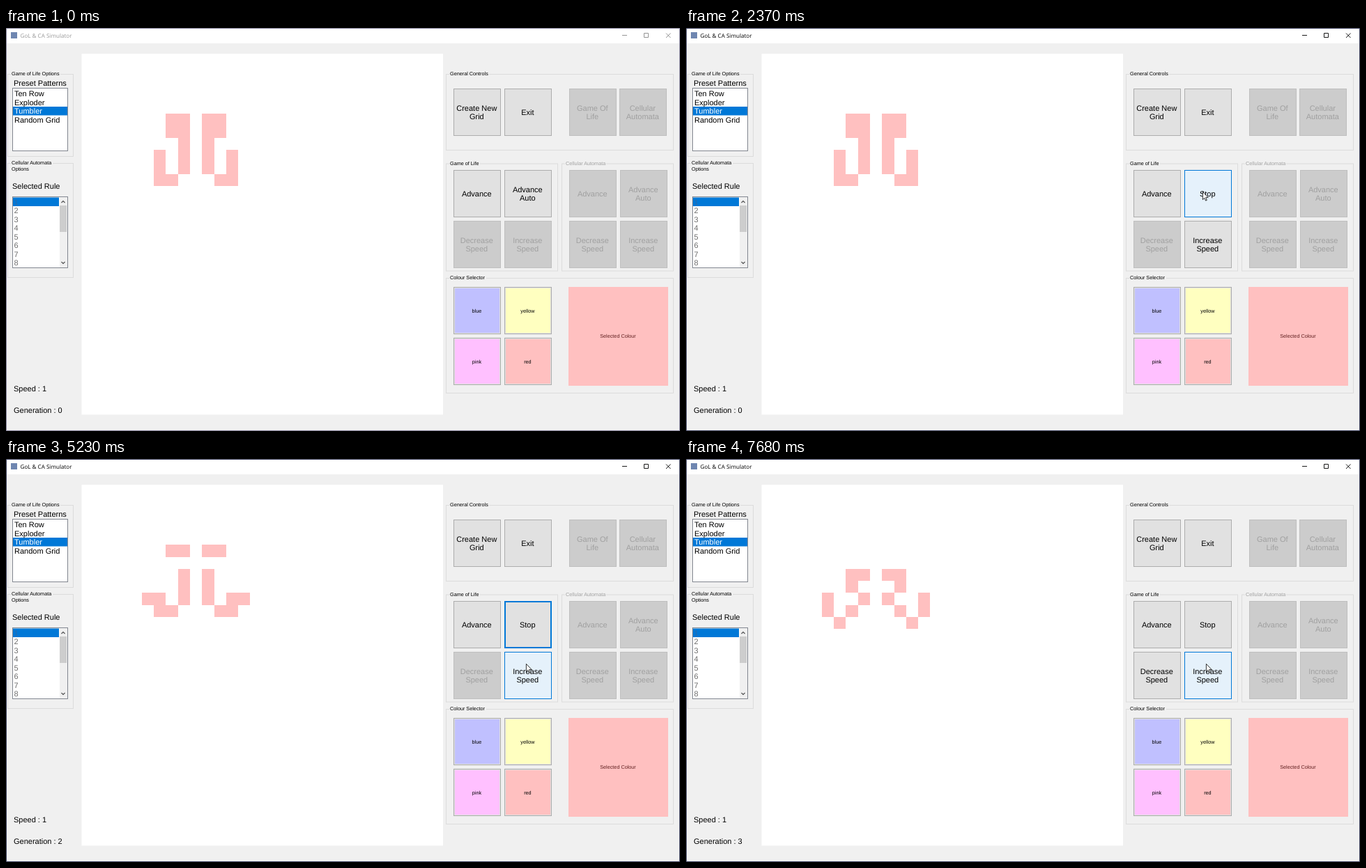
Recreate the animation shown at these times as an HTML page. Size 967 by 579 pixels, loop 8000 ms.

```html
<!DOCTYPE html>
<html lang="en">
<head>
<meta charset="utf-8">
<title>GoL &amp; CA Simulator</title>
<style>
  html, body { margin: 0; width: 100%; height: 100%; overflow: hidden; background: #f0f0f0; }
  svg { display: block; width: 967px; height: 579px; text-rendering: geometricPrecision; }
  text { font: 11px "Liberation Sans", Arial, sans-serif; white-space: pre; }
  .small { font-size: 7.25px; }
  .title { font: 8.1px "Open Sans", "Noto Sans", sans-serif; }
  .mid { text-anchor: middle; }
</style>
</head>
<body>
<svg id="stage" viewBox="0 0 967 579">
  <g id="fixed"></g>
  <g id="live"></g>
</svg>
<script>
const LOOP = 8000, STEP = 70;
const BLUE = '#0078d7', RED = '#ffc0c0';

const rect = (x, y, w, h, fill, extra = '') =>
  `<rect x="${x}" y="${y}" width="${w}" height="${h}" fill="${fill}" ${extra}/>`;
const frame = (x, y, w, h, fill, stroke, line = 1) =>
  rect(x + line / 2, y + line / 2, w - line, h - line, fill, `stroke="${stroke}" stroke-width="${line}"`);
const text = (s, x, y, cls = '', fill = '#000') =>
  `<text x="${x}" y="${y}" class="${cls}" fill="${fill}">${s}</text>`;
const path = (d, stroke, width = 1) =>
  `<path d="${d}" fill="none" stroke="${stroke}" stroke-width="${width}"/>`;

// Button looks: fill, border, border width, text colour
const LOOKS = {
  normal:   ['#e1e1e1', '#adadad', 1, '#000'],
  disabled: ['#cccccc', '#bfbfbf', 1, '#a0a0a0'],
  hover:    ['#e5f1fb', BLUE, 1, '#000'],
  pressed:  ['#cce4f7', '#005499', 1, '#000'],
  focus:    ['#e1e1e1', BLUE, 2, '#000'],
};

function button(x, y, label, look) {
  const [fill, border, line, ink] = LOOKS[look];
  const rows = label.split('|');
  const top = y + 38 - (rows.length - 1) * 6.25;
  return frame(x, y, 68, 68, fill, border, line) +
    rows.map((s, i) => text(s, x + 33.3, top + i * 12.5, 'mid', ink)).join('');
}

function swatch(x, y, name, fill) {
  return frame(x, y, 68, 68, '#e1e1e1', '#adadad') + rect(x + 2, y + 2, 64, 64, fill) +
    text(name, x + 33.4, y + 36.8, 'small mid');
}

// Group box with a caption that interrupts its top edge
function group(x, y, w, h, caption, gap, ink = '#000') {
  return frame(x, y, w, h, 'none', '#dcdcdc') + rect(x + 5, y - 2, gap, 5, '#f0f0f0') +
    caption.split('|').map((s, i) => text(s, x + 6, y + 2.2 + i * 9, 'small', ink)).join('');
}

function drawFixed() {
  let s = rect(0, 0, 967, 579, '#f0f0f0') + rect(0, 0, 967, 22, '#fff') +
    rect(7, 6, 9, 9, '#6f86b0') + rect(108.5, 37, 518.5, 518.5, '#fff');

  s += group(2, 66, 95, 119, 'Game of Life Options', 71) + text('Preset Patterns', 11, 83) +
    frame(9, 86, 80, 91, '#fff', '#828790') + rect(10, 113, 78, 12.5, BLUE);
  ['Ten Row', 'Exploder', 'Tumbler', 'Random Grid'].forEach((name, i) => {
    s += text(name, 12, 98.3 + i * 12.5, '', i === 2 ? '#fff' : '#000');
  });

  s += group(2, 194, 95, 165, 'Cellular Automata|Options', 60) + text('Selected Rule', 9, 231) +
    frame(9, 242, 80, 103, '#fff', '#828790') + rect(10, 243.5, 66, 12.5, BLUE) +
    rect(77, 243, 11, 101, '#f0f0f0') + rect(77, 255, 10, 38, '#cdcdcd') +
    path('M79.5 251l2.5-2.5 2.5 2.5M79.5 336l2.5 2.5 2.5-2.5', '#505050', 1.2);
  for (let i = 0; i < 8; i++) s += text(i + 1, 11.5, 253.6 + i * 12.5, '', i ? '#6d6d6d' : '#2b6ca8');

  s += group(631, 66, 327, 110, 'General Controls', 57) +
    group(631, 194.5, 161, 155, 'Game of Life', 44) +
    group(797, 194.5, 161, 155, 'Cellular Automata', 59, '#a0a0a0') +
    group(631, 359, 327, 166, 'Colour Selector', 53);

  s += button(642, 87, 'Create New|Grid', 'normal') + button(715, 87, 'Exit', 'normal') +
    button(808, 87, 'Game Of|Life', 'disabled') + button(880, 87, 'Cellular|Automata', 'disabled') +
    button(642, 204, 'Advance', 'normal') +
    button(808, 204, 'Advance', 'disabled') + button(881, 204, 'Advance|Auto', 'disabled') +
    button(808, 277, 'Decrease|Speed', 'disabled') + button(881, 277, 'Increase|Speed', 'disabled');

  s += swatch(642, 372, 'blue', '#c0c0ff') + swatch(715, 372, 'yellow', '#ffffc0') +
    swatch(642, 445, 'pink', '#ffc0ff') + swatch(715, 445, 'red', RED) +
    rect(807, 372, 143, 142, RED) + text('Selected Colour', 878, 445.3, 'small mid', '#602020');

  return s + text('Speed : 1', 11, 522);
}

// Game of Life on a 30 x 30 board, cells kept as "row,col"
const SIZE = 30, CELL = 17.28;
const seed = new Set();
[[7, 8], [7, 8], [8], [6, 8], [6, 8], [6, 7]].forEach((cols, i) =>
  cols.forEach(c => { seed.add(`${i + 5},${c}`); seed.add(`${i + 5},${18 - c}`); }));

function evolve(live) {
  const next = new Set();
  for (let r = 0; r < SIZE; r++) for (let c = 0; c < SIZE; c++) {
    let n = 0;
    for (let i = -1; i < 2; i++) for (let j = -1; j < 2; j++)
      if ((i || j) && live.has(`${r + i},${c + j}`)) n++;
    if (n === 3 || (n === 2 && live.has(`${r},${c}`))) next.add(`${r},${c}`);
  }
  return next;
}

const TICKS = [3770, 5230, 6620];
const boards = [seed];
TICKS.forEach(() => boards.push(evolve(boards[boards.length - 1])));

// The counter changes first, then the board repaints from left to right
function drawBoard(t) {
  const gen = TICKS.filter(k => t >= k).length;
  const age = gen ? t - TICKS[gen - 1] : LOOP;
  const painted = age < STEP ? 0 : age < 2 * STEP ? 9 : SIZE;
  const px = n => Math.round(108.5 + n * CELL), py = n => Math.round(36.9 + n * CELL);
  let s = '';
  for (let r = 0; r < SIZE; r++) for (let c = 0; c < SIZE; c++) {
    const board = boards[c < painted || !gen ? gen : gen - 1];
    if (board.has(`${r},${c}`))
      s += rect(px(c), py(r), px(c + 1) - px(c), py(r + 1) - py(r), RED);
  }
  return s + text('Generation : ' + gen, 11, 553);
}

// Pointer moves: start, steps, from, to, easing
const MOVES = [
  [400, 3, [857, 470], [798, 322], p => 1 - (1 - p) ** 2, 0],
  [1010, 11, [798, 322], [741, 235], p => p * p * (3 - 2 * p), 1],
  [2900, 5, [741, 235], [746, 294], p => 1 - (1 - p) ** 2.8, 1],
];

function pointer(t) {
  const move = MOVES.filter(m => t >= m[0]).pop();
  if (!move) return null;
  const [start, steps, from, to, ease, first] = move;
  const p = ease(Math.min(1, (Math.floor((t - start) / STEP) + first) / steps));
  return from.map((v, i) => v + (to[i] - v) * p);
}

const over = (at, x, y) => at && at[0] >= x && at[0] < x + 68 && at[1] >= y && at[1] < y + 68;

function drawLive(t) {
  const active = t >= 2040, running = t >= 2370, faster = t >= 7680;
  const at = pointer(t);
  const ink = active ? '#000' : '#999';

  let auto = 'normal';
  if (active && !running) auto = 'pressed';
  else if (over(at, 715, 204)) auto = 'hover';
  else if (running && t < 7350) auto = 'focus';

  let inc = running ? 'normal' : 'disabled';
  if (t >= 7350 && !faster) inc = 'pressed';
  else if (running && over(at, 715, 277)) inc = 'hover';

  let s = frame(0, 0, 967, 579, 'none', active ? '#3b3f5c' : '#85829a') +
    text('GoL &amp; CA Simulator', 20.5, 13.8, 'title', ink) +
    path('M884 10.5h7M915.5 7.5h6v6h-6zM947 7.5l6.5 6.5m0-6.5l-6.5 6.5', active ? '#000' : '#888', .9) +
    drawBoard(t) +
    button(715, 204, running ? 'Stop' : 'Advance|Auto', auto) +
    button(642, 277, 'Decrease|Speed', faster ? 'normal' : 'disabled') +
    button(715, 277, 'Increase|Speed', inc);

  if (at) s += `<path transform="translate(${at[0].toFixed(1)} ${at[1].toFixed(1)})" ` +
    'd="M.4.4V11.6L2.9 9.3 4.6 13.1 6.3 12.4 4.7 8.6H8.2Z" fill="#fff" stroke="#000" stroke-width=".8"/>';
  return s;
}

const live = document.getElementById('live');
let shown = '';

function render(now) {
  const markup = drawLive(now % LOOP);
  if (markup !== shown) live.innerHTML = shown = markup;
}

function loop(now) {
  render(now - begin);
  requestAnimationFrame(loop);
}

document.getElementById('fixed').innerHTML = drawFixed();
const begin = performance.now();
render(0);
requestAnimationFrame(now => loop(Math.max(now, begin)));
</script>
</body>
</html>
```
